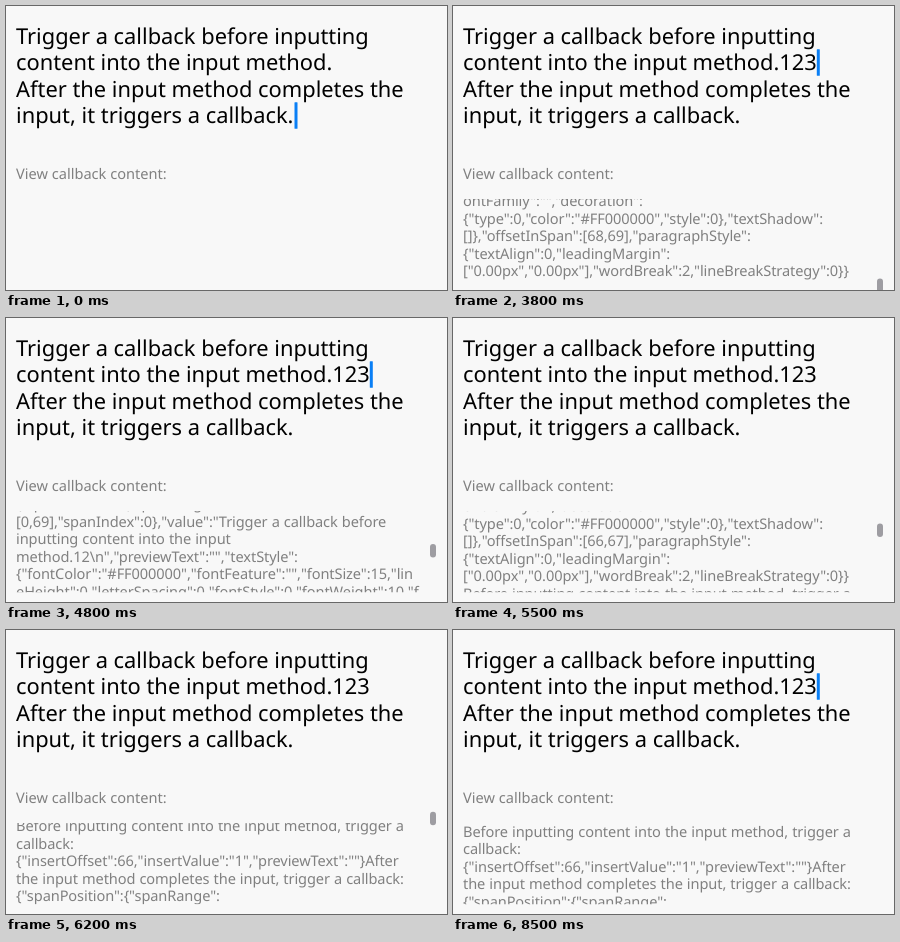
An HTML page for the animation above (8.8 s loop, 441 px wide and 284 px high).

```html
<!DOCTYPE html>
<html lang="en">
<head>
<meta charset="utf-8">
<title>Input callbacks</title>
<style>
  html, body { margin: 0; width: 100%; height: 100%; overflow: hidden; background: #f8f8f8; }
  svg { display: block; }
  text { font-family: "Noto Sans", "Open Sans", sans-serif; white-space: pre; text-rendering: geometricPrecision; }
  #title { font-size: 21.87px; }
  .small { font-size: 14.6px; fill: #808080; }
  #log { letter-spacing: -0.1px; word-spacing: 0.4px; }
</style>
</head>
<body>
<svg id="stage" width="441" height="284">
  <g id="title"></g>
  <text class="small" x="10" y="173">View callback content:</text>
  <svg y="193" width="441" height="81.3"><g id="log" class="small"></g></svg>
  <rect id="thumb" x="424" width="6" rx="3" fill="#9e9da2"/>
  <rect id="caret" width="3" height="26.5" rx="0.5" fill="#0a7ff5"/>
</svg>
<script>
const LOOP = 8800, LINE = 17.5, VIEW = 105, PAD = 24, VIEW_TOP = 181;
const TYPED = [1900, 2400, 2800];
// Times at which the caret turns off, then on again, and so on
const BLINKS = [400, 800, 1500, 1900, 3400, 3800, 4300, 4700, 5200, 5600, 6100, 6600, 7100, 7500, 8000, 8500];
// [time, scroll offset in pixels]
const SCROLL = [[4200, 706.5], [4300, 690], [4500, 565], [4800, 348], [5000, 238], [5100, 214], [5400, 214],
  [5500, 188.5], [5700, 112], [5900, 50], [6100, 12], [6200, 5.5], [6500, 5.5], [6600, 2], [6700, 0]];

const byId = id => document.getElementById(id);
const title = byId('title'), log = byId('log'), thumb = byId('thumb'), caret = byId('caret');

function place(el, attrs) {
  for (const name in attrs) el.setAttribute(name, attrs[name]);
}

function addLine(parent, y, content) {
  const el = document.createElementNS('http://www.w3.org/2000/svg', 'text');
  place(el, { x: 10, y });
  el.textContent = content;
  parent.append(el);
  return el;
}

const entry = n => `Before inputting content into the input method, trigger a
callback:
{"insertOffset":${65 + n},"insertValue":"${n}","previewText":""}After
the input method completes the input, trigger a callback:
{"spanPosition":{"spanRange":
[0,${67 + n}],"spanIndex":0},"value":"Trigger a callback before
inputting content into the input
method.${'123'.slice(0, n)}\\n","previewText":"","textStyle":
{"fontColor":"#FF000000","fontFeature":"","fontSize":15,"lin
eHeight":0,"letterSpacing":0,"fontStyle":0,"fontWeight":10,"f
ontFamily":"","decoration":
{"type":0,"color":"#FF000000","style":0},"textShadow":
[]},"offsetInSpan":[${65 + n},${66 + n}],"paragraphStyle":
{"textAlign":0,"leadingMargin":
["0.00px","0.00px"],"wordBreak":2,"lineBreakStrategy":0}}`.split('\n');

const titleLines = ['Trigger a callback before inputting', 'content into the input method.',
  'After the input method completes the', 'input, it triggers a callback.']
  .map((s, i) => addLine(title, 37.7 + 26.45 * i, s));
const logLines = [1, 2, 3].flatMap(entry).map((s, i) => addLine(log, 13.7 + LINE * i, s));

function scrollAt(t) {
  const i = SCROLL.findIndex(([time]) => time > t);
  if (i < 0) return 0;
  const [t0, s0] = SCROLL[i - 1], [t1, s1] = SCROLL[i];
  return s0 + (s1 - s0) * (t - t0) / (t1 - t0);
}

let shown = -1;
function setTyped(n) {
  if (n === shown) return;
  shown = n;
  titleLines[1].textContent = 'content into the input method.' + '123'.slice(0, n);
  logLines.forEach((el, i) => el.style.display = i < n * 15 ? '' : 'none');
}

function draw(now) {
  // The picture advances in tenths of a second
  const t = Math.floor(now % LOOP / 100) * 100;
  const n = TYPED.filter(time => t >= time).length;
  setTyped(n);

  const total = n * 15 * LINE + PAD;
  const s = t < SCROLL[0][0] ? Math.max(0, total - VIEW) : scrollAt(t);
  log.setAttribute('transform', `translate(0 ${-s})`);
  place(thumb, {
    y: VIEW_TOP + s * VIEW / total,
    height: VIEW * VIEW / total,
    visibility: n && t < 8500 ? 'visible' : 'hidden'
  });

  const atEnd = t < 1100;
  place(caret, {
    x: atEnd ? 288.5 : 325.4 + 12.8 * n,
    y: atEnd ? 96.2 : 43.3,
    visibility: BLINKS.filter(time => t >= time).length % 2 ? 'hidden' : 'visible'
  });
}

const start = performance.now();
function tick() {
  draw(performance.now() - start);
  requestAnimationFrame(tick);
}
tick();
</script>
</body>
</html>
```
